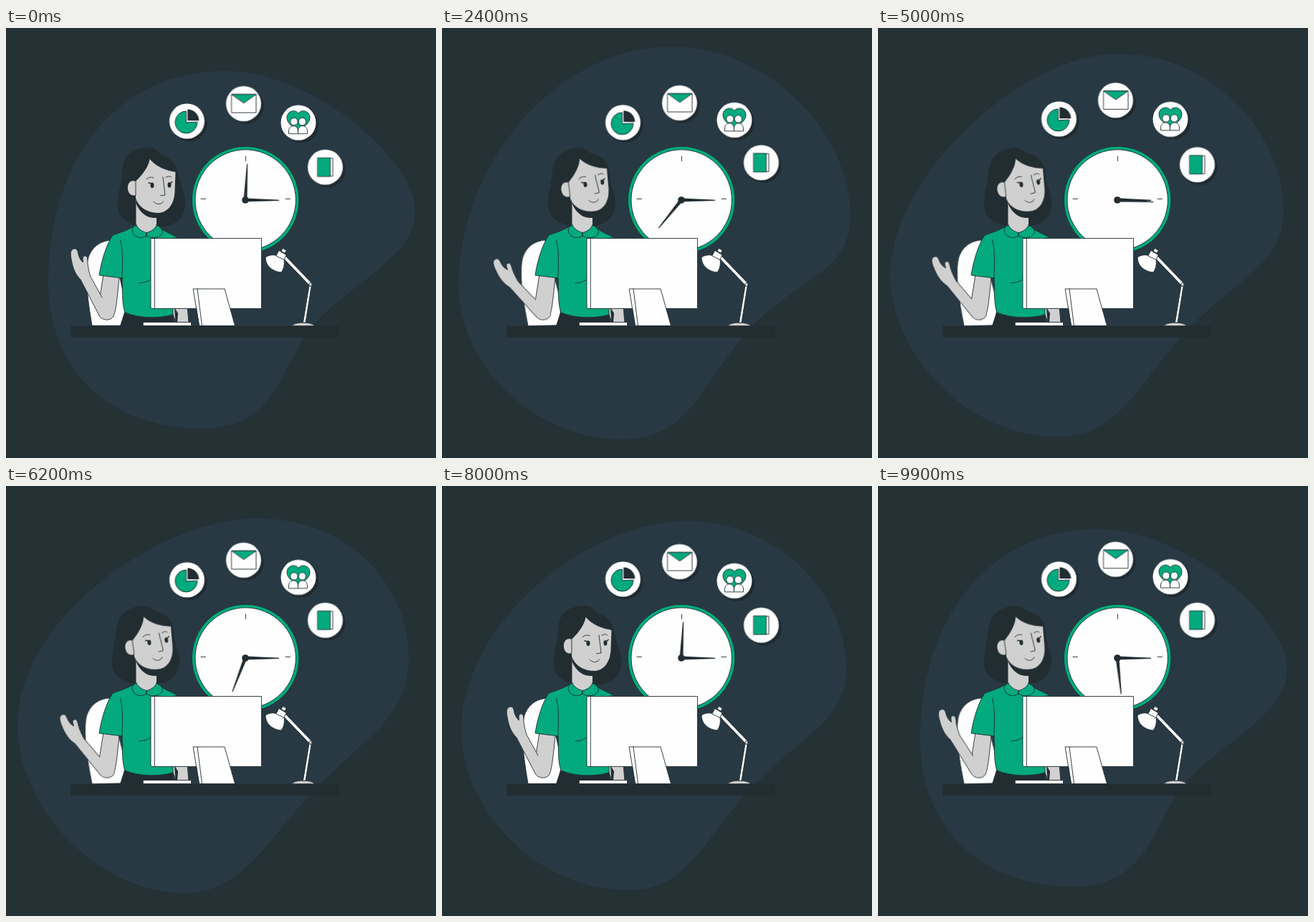
An HTML page without scripts that plays this animation: 600x600 px, repeating every 10 s.

```html
<!DOCTYPE html>
<html lang="en">
<head>
<meta charset="utf-8">
<title>Working hours</title>
<style>
  :root {
    --ink: #222d32;
    --green: #02aa7d;
    --skin: #d0d0d0;
    --sine: cubic-bezier(.37, 0, .63, 1);
  }
  html, body { margin: 0; width: 100%; height: 100%; overflow: hidden; background: #243135; }
  svg { display: block; width: 100vw; height: 100vh; }

  .w { fill: #fefefe; }
  .g { fill: var(--green); }
  .s { fill: var(--skin); }
  .k { fill: var(--ink); }
  .n { fill: none; }
  .line { stroke: var(--ink); stroke-width: .9; stroke-linejoin: round; stroke-linecap: round; }
  .bold { stroke-width: 1.5; }

  .blob, .chair, .hair, .head, .arm, .minute, .icon { animation: 10s var(--sine) infinite; }

  .blob { fill: #283944; animation-name: blob; }
  @keyframes blob {
    0%, 100% {
      d: path("M305 60C430 60 571 185 571 255C571 315 500 345 437 405C385 455 385 559 275 559C140 559 59 473 59 355C59 182 157 60 305 60Z");
    }
    0% { animation-timing-function: ease-in; }
    24% {
      d: path("M320 26C460 26 570 150 570 262C570 345 490 350 425 425C360 500 345 574 250 574C125 574 23 465 23 360C23 190 160 26 320 26Z");
      animation-timing-function: ease-out;
    }
    36% {
      d: path("M320 23C460 23 570 150 570 262C570 345 495 345 425 430C350 510 340 576 245 576C120 576 17 460 17 350C17 185 160 23 320 23Z");
    }
    50% {
      d: path("M335 36C470 36 566 150 566 255C566 325 510 345 445 408C365 485 345 570 250 570C120 570 17 450 17 345C17 208 200 36 335 36Z");
      animation-timing-function: linear;
    }
    62% {
      d: path("M350 45C480 45 562 140 562 240C562 320 505 348 440 415C370 482 335 568 250 568C125 568 16 445 16 335C16 182 219 45 350 45Z");
      animation-timing-function: ease-in;
    }
    80% {
      d: path("M340 49C470 49 564 150 564 255C564 325 505 348 445 408C370 478 350 564 262 564C130 564 27 450 27 340C27 193 202 49 340 49Z");
      animation-timing-function: ease-out;
    }
  }

  .minute {
    transform-origin: 334px 240px;
    animation-name: minute;
    animation-timing-function: steps(100);
  }
  @keyframes minute {
    from { transform: rotate(3deg); }
    to { transform: rotate(903deg); }
  }

  .arm { transform-origin: 141px 394px; animation-name: arm; }
  @keyframes arm {
    0%, 15.5%, 35%, 40%, 55.5%, 75%, 80% { transform: rotate(0deg); }
    7.5%, 25%, 47.5%, 65%, 87.5% { transform: rotate(-15deg); }
    95.5% { transform: rotate(0deg); animation-timing-function: ease-in; }
    100% { transform: rotate(-6.5deg); }
  }

  .head { transform-origin: 193px 252px; animation-name: head; }
  @keyframes head {
    0%, 36%, 40%, 76%, 80% { transform: rotate(0deg); }
    9%, 25%, 49%, 65%, 89%, 100% { transform: rotate(-7deg); }
  }

  .hair { animation-name: hair; }
  @keyframes hair {
    0%, 40%, 80% { transform: translate(0, 0); }
    9%, 25%, 49%, 65%, 89%, 100% { transform: translate(-8px, -1px); }
  }

  .chair { transform-origin: 140px 415px; animation-name: chair; }
  @keyframes chair {
    0%, 38%, 40%, 78%, 80% { transform: rotate(0deg); }
    9%, 25%, 49%, 65%, 89%, 100% { transform: rotate(-1.5deg); }
  }

  .pie { animation-name: pie; }
  .mail { animation-name: mail; }
  .team { animation-name: team; }
  .book { animation-name: book; }
  @keyframes pie {
    0% { transform: translateY(0); animation-timing-function: ease-out; }
    10%, 50%, 90% { transform: translateY(-3px); }
    30%, 70% { transform: translateY(3px); }
    90% { animation-timing-function: ease-in; }
    100% { transform: translateY(0); }
  }
  @keyframes mail {
    0% { transform: translateY(1.6px); animation-timing-function: ease-out; }
    13%, 53%, 93% { transform: translateY(-3.5px); }
    33%, 73% { transform: translateY(3.5px); }
    93% { animation-timing-function: ease-in; }
    100% { transform: translateY(-1.6px); }
  }
  @keyframes team {
    0% { transform: translateY(2.6px); }
    16%, 56%, 96% { transform: translateY(-3.5px); }
    36%, 76% { transform: translateY(3.5px); }
    96% { animation-timing-function: ease-in; }
    100% { transform: translateY(-2.8px); }
  }
  @keyframes book {
    0%, 40%, 80% { transform: translateY(3.5px); }
    20%, 60%, 100% { transform: translateY(-3.5px); }
  }
</style>
</head>
<body>
<svg viewBox="0 0 600 600" xmlns="http://www.w3.org/2000/svg">
  <defs>
    <g id="disc">
      <circle cx="3.5" cy="3.5" r="24.5" fill="#1f2a31"/>
      <circle class="w" r="24.5"/>
    </g>
  </defs>

  <path class="blob" d="M305 60C430 60 571 185 571 255C571 315 500 345 437 405C385 455 385 559 275 559C140 559 59 473 59 355C59 182 157 60 305 60Z"/>

  <!-- clock -->
  <g class="line">
    <circle class="g" cx="334.2" cy="240" r="74.8"/>
    <circle class="w" cx="334.2" cy="240" r="70.2"/>
    <path class="n" d="M334.500 179v6.500M272 238.500h6.500M390 238.500h6.500"/>
  </g>
  <path class="k" d="M334 237.500L381 239.700V241L334 242.500Z"/>
  <path class="k minute" d="M331.500 240L333.400 189.500H334.600L336.500 240Z"/>
  <circle class="k" cx="334" cy="240" r="4.800"/>

  <!-- icons -->
  <g transform="translate(252.500 130)">
    <g class="icon pie">
      <use href="#disc"/>
      <path class="g line" d="M-1 1.500V-14A15.500 15.500 0 1 0 14.500 1.500Z"/>
      <path class="k" d="M.8 -16.500A16 16 0 0 1 16.800 -.8H.8Z"/>
    </g>
  </g>
  <g transform="translate(331.500 104)">
    <g class="icon mail">
      <use href="#disc"/>
      <path class="w line" d="M-16.500 -13h34v25.500h-34Z"/>
      <path class="g line" d="M-16.500 -13h34L.5 -1Z"/>
    </g>
  </g>
  <g transform="translate(408 129.500)">
    <g class="icon team">
      <use href="#disc"/>
      <g class="line">
        <path class="g" d="M0 10C-8 6 -16 1 -16 -7C-16 -17 -4 -19 0 -13C4 -19 16 -17 16 -7C16 1 8 6 0 10Z"/>
        <path class="w" d="M-13.500 15V12C-13.500 2 -.5 2 -.5 12V15ZM-.5 15V12C-.5 2 12.500 2 12.500 12V15Z"/>
        <circle class="w" cx="-6" cy="-1.500" r="5.200"/>
        <circle class="w" cx="5.500" cy="-1.500" r="5.200"/>
      </g>
    </g>
  </g>
  <g transform="translate(445.500 190.700)">
    <g class="icon book">
      <use href="#disc"/>
      <g class="line">
        <path class="w" d="M6 -12.500h4.500v25H6Z"/>
        <path class="g" d="M-10.500 -13H7V13H-10.500Z"/>
      </g>
    </g>
  </g>

  <!-- chair and back hair -->
  <path class="chair w line" d="M120 415C114 380 109 342 115 320C121 303 134 297 147 296L166 380V415Z"/>
  <path class="hair k" d="M200 180C172 182 163 190 162 202C161 220 155 232 156 250C157 268 176 278 204 278C236 279 250 266 250 245C250 230 243 222 241 205C236 185 220 180 200 180Z"/>

  <!-- body -->
  <path class="k" d="M165 397L159 416H233V397Z"/>
  <path class="s line" d="M136 344L129 388C131 402 145 409 150 402C153 396 155 380 158 348Z"/>
  <path class="s line" d="M229 388L237 411H255L253 388Z"/>
  <path class="k" d="M235 390L236.500 411H239L240 398Z"/>
  <path class="g line" d="M180 276C168 283 157 286 149 289C140 302 133 325 130 345L162 349C163 365 161 382 166 397C185 405 212 406 233 400V293H240C234 288 222 286 212 276Z"/>
  <path class="n line" d="M162 349C162 330 164 312 159.500 296M186 356C193 355.500 198 354 203 350"/>
  <path class="s" d="M181.500 236V276C185 282 190 285 196 286C203 285 208 281 210 276V240Z"/>
  <path class="k" d="M181.500 238V245C188 261 200 266 210 265V245Z"/>
  <path class="g line" d="M182 275C176 277 174 283 179 289C184 294 191 293 196 290V285.500C190 284 184 280 182 275ZM210 275C216 278 221 283 217 288C212 294 202 294 196 290V285.500C203 284 208 280 210 275Z"/>

  <!-- head -->
  <g class="head">
    <path class="k" d="M201 167C180 167 164 175 163 194C162 206 160 216 159 226L180 238L237 230L240 210C241 193 232 181 217 177C212 171 208 168 201 167Z"/>
    <path class="s" d="M200.500 183C199 194 190 205 181 214C173 211 169 218 170 225C171 232 176 235 181 233V237C185 251 198 258 213 258C228 257 235 243 235.500 228L236.500 201C224 199 210 194 200.500 183Z"/>
    <path class="n line" d="M181 214V233"/>
    <path class="n line" d="M196 211C199 208 203 207.500 206 209M223 208.500C226 206.500 229 206.500 231 208.500M219 208L222 233L215.500 234M206 242C210 247 217 247 219.500 242"/>
    <path class="n line bold" d="M203 217L199 216M229 217L232 214.500"/>
    <ellipse class="k" cx="204" cy="219.500" rx="2.500" ry="3.700"/>
    <ellipse class="k" cx="228" cy="219" rx="2.500" ry="3.700"/>
  </g>

  <!-- raised forearm -->
  <path class="arm s line" d="M134 376L118 347C116 341 115 336 114 329C114 322 114 318 110 318C106.500 318 107 323 107.500 327C104 324 102 320 101 316C100 310 99 308 95.500 308C91 308 89 313 91 322C93 335 97 344 104 351L130 401C133 408 146 410 150 402"/>

  <!-- desk, monitor, keyboard -->
  <rect class="k" x="90" y="415.500" width="375" height="16.500"/>
  <g class="line w">
    <path d="M191.500 410.500H258.500V415.500H191.500Z"/>
    <path d="M204 293.500H356.500V391.500H204C202.500 391.500 202 390.500 202 389V295.500C202 294 202.500 293.500 204 293.500Z"/>
    <path class="n" d="M207.300 293.500V391.500"/>
    <path d="M261.500 364H305L319.500 415.500H270Z"/>
    <path class="n" d="M267 364L273.500 415.500"/>
  </g>

  <!-- lamp -->
  <g class="line w">
    <path class="s" d="M399 415.500C402 409.500 427 409.500 430.500 415.500Z"/>
    <path d="M414.500 411L422.900 360H426.200L418 411Z"/>
    <path d="M387.500 321.500L390.500 318.500L426 355.500L423 358.500Z"/>
    <circle cx="425" cy="358" r="2.200"/>
    <path d="M384 311L386.500 307.500L391 310L389.500 314Z"/>
    <path d="M362 320C366 317 373 315.500 379 318L388 323C389 329 388 336 384 341C372 340 362 332 362 320Z"/>
    <path d="M381 310.500L391 316.500L388 323.500L377 318Z"/>
  </g>
</svg>
</body>
</html>
```
